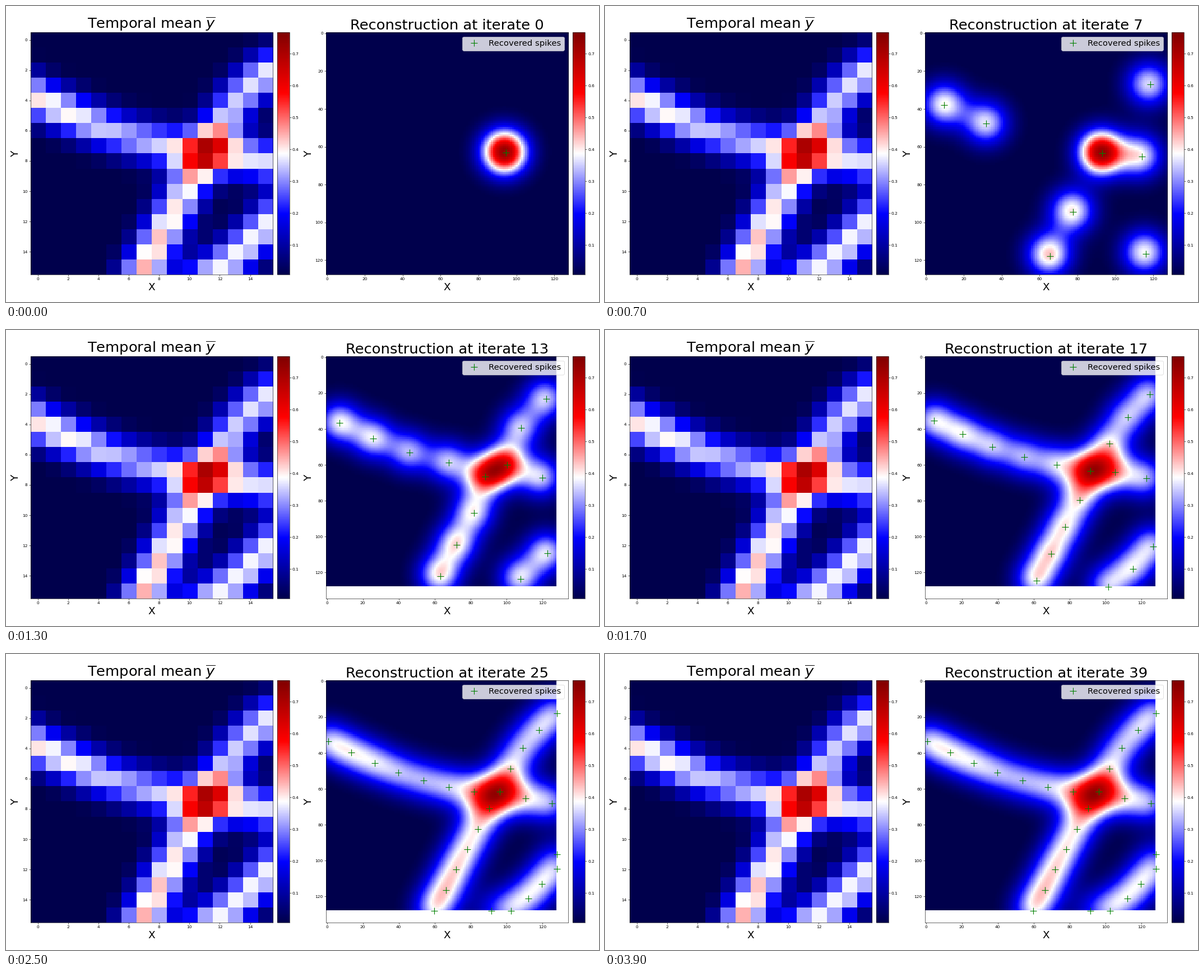
Recreate the animation shown at these times as a matplotlib script. Size 1058x529 px, loop 4300 ms.

```python
import numpy as np
import matplotlib.pyplot as plt
from matplotlib.animation import FuncAnimation
from mpl_toolkits.axes_grid1 import make_axes_locatable

W, H, DPI = 1058, 529, 52.9
SIDE = 128                     # side of the reconstructed domain
SIGMA = 8.5                    # width of the displayed blur
SHARP = SIGMA / np.sqrt(2)     # width of the blur used for fitting
VMIN, VMAX = 0.0082, 0.7665
LAST = 39                      # final iterate, held until the loop ends
FRAMES = 43
WIDE_FROM = 13                 # iterate at which the view gains a margin
TOL = 0.006                    # smallest residual worth a new spike

# filaments as key points: x and y in cells of the mean image, brightness
FILAMENTS = [
    [(-3, 2.4, .41), (0, 3.93, .41), (3, 5.3, .39), (5.5, 6.3, .32),
     (9, 7.15, .36), (12, 7.5, .38), (18, 8.5, .34)],
    [(17, 1.2, .38), (15, 2.05, .385), (13, 4, .34), (11.7, 6.2, .36),
     (10.2, 9, .38), (8.6, 12, .42), (7.05, 15, .45), (5.9, 17.2, .45)],
    [(17, 10.5, .38), (15, 12.15, .385), (13.2, 14.2, .385), (11.9, 15.05, .38),
     (9.5, 16.6, .36)],
]


# ---- blurred points ----

def kernels(pts, size, sigma):
    """Offsets and Gaussian profiles of each point along both axes."""
    offset = np.linspace(0, SIDE, size) - pts[:, :2].T[:, :, None]
    return offset, np.exp(-offset ** 2 / (2 * sigma ** 2))


def render(pts, size, sigma=SIGMA):
    """Sum of Gaussian spots; each row of pts is x, y, amplitude."""
    _, (gx, gy) = kernels(pts, size, sigma)
    return (gy * pts[:, 2:]).T @ gx


def sample(keys, step=1.0):
    """Evenly spaced weighted points along a filament."""
    keys = np.array(keys) * [SIDE / 15, SIDE / 15, 1]
    length = np.r_[0, np.cumsum(np.hypot(*np.diff(keys[:, :2], axis=0).T))]
    s = np.arange(0, length[-1], step)
    pts = np.stack([np.interp(s, length, col) for col in keys.T], axis=1)
    pts[:, 2] *= step / (SIGMA * np.sqrt(2 * np.pi))
    return pts


# ---- spike recovery: add the brightest residual, then slide all spikes ----

GRID = 32


def jacobian(pts):
    """Derivatives of the sharp image by x, y and amplitude of each spike."""
    (dx, dy), (gx, gy) = kernels(pts, GRID, SHARP)
    amp = pts[:, 2:] / SHARP ** 2
    parts = [(gy, amp * dx * gx), (amp * dy * gy, gx), (gy, gx)]
    cols = [v[:, :, None] * u[:, None, :] for v, u in parts]
    return np.stack(cols, axis=1).reshape(pts.size, -1).T


def slide(pts, goal, rounds=30):
    """Bounded Levenberg-Marquardt descent on positions and amplitudes."""
    top = np.array([SIDE, SIDE, 2.0])
    res = (goal - render(pts, GRID, SHARP)).ravel()
    damp = 1e-2
    for _ in range(rounds):
        jac = jacobian(pts)
        pull = (jac.T @ res).reshape(pts.shape)
        stuck = ((pts <= 0) & (pull < 0)) | ((pts >= top) & (pull > 0))
        jac[:, stuck.ravel()] = 0
        normal = jac.T @ jac
        normal += np.diag(damp * np.diag(normal) + 1e-9)
        move = np.linalg.solve(normal, jac.T @ res).reshape(pts.shape)
        trial = np.clip(pts + move, 0, top)
        trial_res = (goal - render(trial, GRID, SHARP)).ravel()
        if trial_res @ trial_res < res @ res:
            pts, res, damp = trial, trial_res, damp / 3
        else:
            damp *= 4
    return pts


def new_spike(residual):
    """Spike where the residual correlates best with the kernel."""
    axis = np.arange(SIDE + 1.0)
    centres = np.stack([axis, axis, axis], axis=1)
    _, (g, _) = kernels(centres, GRID, SHARP)
    score = g @ residual @ g.T / (np.pi * (SHARP * (GRID - 1) / SIDE) ** 2)
    y, x = np.unravel_index(score.argmax(), score.shape)
    return np.array([[x, y, score[y, x]]], dtype=float)


def iterates(goal):
    pts = np.empty((0, 3))
    history = []
    for _ in range(LAST + 1):
        spike = new_spike(goal - render(pts, GRID, SHARP))
        if spike[0, 2] > TOL:
            pts = slide(np.vstack([pts, spike]), goal)
            pts = pts[pts[:, 2] > TOL / 2]
        history.append(pts)
    return history


sources = np.vstack([sample(f) for f in FILAMENTS])
mean = render(sources, 16)
history = iterates(render(sources, GRID, SHARP))
images = [render(pts, SIDE) for pts in history]


# ---- figure ----

def panel(ax, data):
    im = ax.imshow(data, cmap="seismic", vmin=VMIN, vmax=VMAX)
    ax.set_xlabel("X", fontsize=25)
    ax.set_ylabel("Y", fontsize=25)
    cax = make_axes_locatable(ax).append_axes("right", size="5%", pad=0.15)
    fig.colorbar(im, cax=cax)
    return im


plt.rcParams["font.family"] = "DejaVu Sans"
fig, (left, right) = plt.subplots(1, 2, figsize=(W / DPI, H / DPI), dpi=DPI)

panel(left, mean)
left.set_title(r"Temporal mean $\overline{y}$", fontsize=35)

image = panel(right, images[0])
title = right.set_title("Reconstruction at iterate 0", fontsize=35)
marks, = right.plot([], [], "+", color="green", markersize=16,
                    markeredgewidth=1.5, label="Recovered spikes")
right.legend(loc="upper right", fontsize=20)
fig.tight_layout()


def update(frame):
    k = min(frame, LAST)
    image.set_data(images[k])
    marks.set_data(history[k][:, 0], history[k][:, 1])
    title.set_text(f"Reconstruction at iterate {k}")
    margin = 0.05 * (SIDE + 0.5) + 0.5 if k >= WIDE_FROM else 0
    limit = SIDE - 0.5 + margin
    right.set_xlim(-0.5, limit)
    right.set_ylim(limit, -0.5)
    return image, marks, title


anim = FuncAnimation(fig, update, frames=FRAMES, interval=100,
                     repeat=True, repeat_delay=0, blit=False)
plt.show()
```
